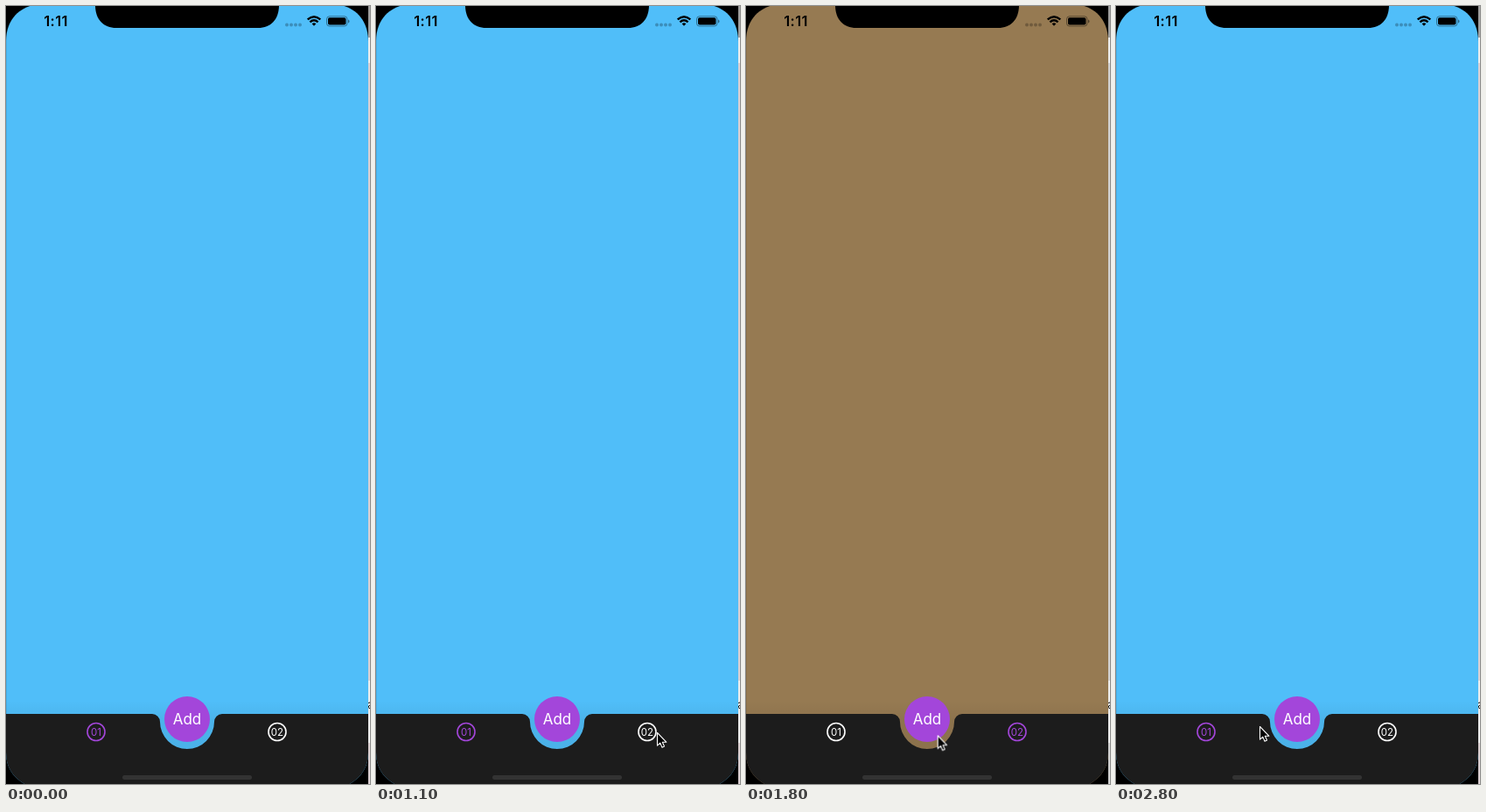
An HTML page that plays this animation: 416 by 888 pixels, repeating every 2900 ms.

```html
<!DOCTYPE html>
<html lang="en">
<head>
<meta charset="utf-8">
<title>Tab bar</title>
<style>
  html, body { margin: 0; width: 100%; height: 100%; overflow: hidden; background: #000; }
  svg { display: block; width: 416px; height: 888px; font-family: Inter, Roboto, sans-serif; }
  text { text-anchor: middle; }

  :root { --blue: #50bef9; --brown: #967a52; --on: #a346da; --off: #fff; }
  .page, .tab, .edge, .cursor { animation: 2900ms step-end infinite; }
  .page { fill: var(--blue); animation-name: page; }
  .edge { fill: #dcd0d2; animation-name: edge; }
  .tab { font-size: 11.5px; }
  .tab circle { fill: none; stroke: currentColor; stroke-width: 1.6; }
  .tab text { fill: currentColor; }
  .first { color: var(--on); animation-name: first; }
  .second { color: var(--off); animation-name: second; }
  .cursor { animation-name: cursor; }

  /* The second tab is open from 1.4 s to 2.4 s. */
  @keyframes page { 0%, 82.7586% { fill: var(--blue); } 48.2758% { fill: var(--brown); } }
  @keyframes edge { 0%, 82.7586% { fill: #dcd0d2; } 48.2758% { fill: #d2d2d2; } }
  @keyframes first { 0%, 82.7586% { color: var(--on); } 48.2758% { color: var(--off); } }
  @keyframes second { 0%, 82.7586% { color: var(--off); } 48.2758% { color: var(--on); } }

  /* The pointer moves once every 100 ms. */
  @keyframes cursor {
    0% { transform: translate(420px, 876px); }
    20.6896% { transform: translate(420px, 876px); animation-timing-function: steps(3); }
    31.0344% { transform: translate(335px, 829px); animation-timing-function: steps(3); }
    41.3793% { transform: translate(314px, 829px); }
    51.7241% { transform: translate(314px, 829px); animation-timing-function: steps(2); }
    58.6206% { transform: translate(262px, 832px); animation-timing-function: steps(3); }
    68.9655% { transform: translate(132px, 833px); animation-timing-function: steps(2); }
    75.862% { transform: translate(102px, 831px); }
    82.7586% { transform: translate(102px, 831px); animation-timing-function: steps(4); }
    96.5517%, 100% { transform: translate(164px, 822px); }
  }
</style>
</head>
<body>
<svg viewBox="0 0 416 888">
  <defs>
    <clipPath id="screen">
      <path d="M0 40C0 21 10 4 31 -1H383C404 4 414 21 414 40V852C414 869 406 881 391 889H23C8 881 0 869 0 852Z"/>
    </clipPath>
    <linearGradient id="shade" x2="0" y2="1">
      <stop offset="0" stop-opacity="0"/>
      <stop offset=".4" stop-opacity=".06"/>
      <stop offset="1" stop-opacity=".07"/>
    </linearGradient>
  </defs>

  <rect width="416" height="888"/>
  <rect class="edge" x="414" width="2" height="888"/>
  <path fill="#a0a0a0" d="M414 0h2v36h-2z"/>
  <path fill="#eee" d="M414 36h2v29h-2zM414 770h2v71h-2z"/>
  <path d="M416 795q-2 0-2 1.2M416 798q-2 .6-1.6 2.4t1.6 1.2" fill="none" stroke="#000"/>

  <g clip-path="url(#screen)">
    <rect class="page" width="414" height="888"/>
    <rect y="793" width="414" height="56" fill="url(#shade)"/>
    <path fill="#1c1c1c" d="M0 808H167A9 9 0 0 1 176 817A31 31 0 0 0 238 817A9 9 0 0 1 247 808H414V888H0Z"/>
    <rect x="133" y="878" width="148" height="5" rx="2.5" fill="#333"/>
    <path d="M.25 30V808" stroke="#000" stroke-opacity=".3" stroke-width=".5"/>
  </g>

  <path d="M102 -1C102 15 111 25 126 25H288C303 25 312 15 312 -1Z"/>
  <text x="57" y="23" font-size="16.5" font-weight="600" letter-spacing=".3">1:11</text>
  <g fill-opacity=".25">
    <circle cx="321" cy="21.5" r="2"/>
    <circle cx="326" cy="21.5" r="2"/>
    <circle cx="331" cy="21.5" r="2"/>
    <circle cx="336" cy="21.5" r="2"/>
  </g>
  <g fill="none" stroke="#000" stroke-width="2.4">
    <path d="M344.7 15.4Q352 9 359.3 15.4M347.4 18.3Q352 14.2 356.6 18.3"/>
    <path d="M349.6 20.3Q352 18.3 354.4 20.3L352 22.8Z" fill="#000" stroke="none"/>
  </g>
  <rect x="366.5" y="11.8" width="23.5" height="11.2" rx="3.2" fill="none" stroke="#000" stroke-opacity=".4"/>
  <rect x="368" y="13.3" width="20.5" height="8.2" rx="1.8"/>
  <path d="M391 15.5q1.5.5 1.5 2t-1.5 2z" fill-opacity=".45"/>

  <circle cx="207" cy="814" r="26" fill="#a346da"/>
  <text x="207" y="820.3" font-size="17" fill="#fff">Add</text>

  <g class="tab first">
    <circle cx="103" cy="828.5" r="10"/>
    <text x="103" y="832.7">01</text>
  </g>
  <g class="tab second">
    <circle cx="310" cy="828.5" r="10"/>
    <text x="310" y="832.7">02</text>
  </g>

  <g class="cursor">
    <path d="M.5 .5V15.2L3.8 12.1L6 17.2L8.5 16.1L6.3 11.2H10.8Z" stroke="#fff" stroke-width="1.1" stroke-linejoin="round"/>
  </g>
</svg>
</body>
</html>
```
